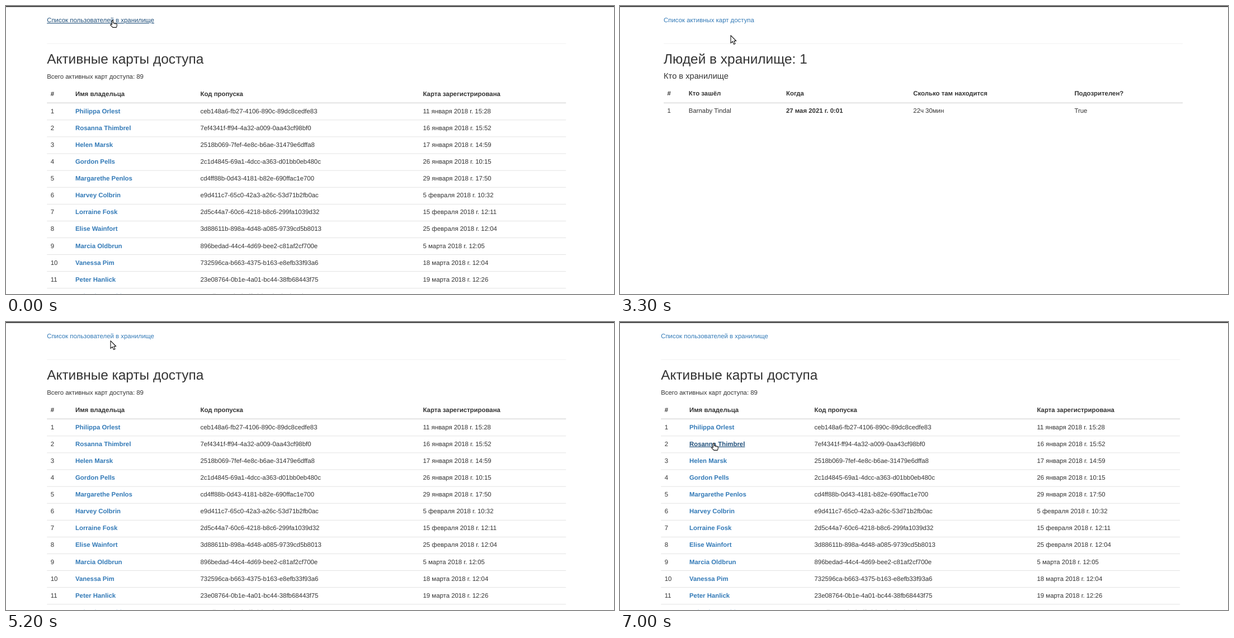
Animation of 1087 by 515 pixels, one loop 8000 ms. Source, as an HTML page:

```html
<!DOCTYPE html>
<html lang="ru">
<head>
<meta charset="utf-8">
<title>Карты доступа</title>
<style>
html, body { margin: 0; width: 100%; height: 100%; overflow: hidden; background: #fff; }
svg { display: block; }
text { font: 11.4px "Liberation Sans", Arial, Helvetica, sans-serif; fill: #333; text-rendering: geometricPrecision; white-space: pre; }
.bold { font-weight: 700; }
.h2 { font-size: 24.42px; }
.h4 { font-size: 14.65px; }
.link { fill: #337ab7; }
.link.hover { fill: #23527c; text-decoration: underline; }
.cursor { fill: #fff; stroke: #111; stroke-width: 1.1; stroke-linejoin: round; }
</style>
</head>
<body>
<svg id="stage" width="1087" height="515" viewBox="0 0 1087 515"></svg>
<script>
const LOOP = 8000;
const WIDTH = 928;
const ROW = 30.1;
const LINE = 0.814;
const stage = document.getElementById('stage');

function add(parent, tag, attrs = {}, content) {
  const node = document.createElementNS('http://www.w3.org/2000/svg', tag);
  for (const key in attrs) node.setAttribute(key, attrs[key]);
  if (content) node.textContent = content;
  parent.appendChild(node);
  return node;
}

const text = (parent, x, y, content, cls = '') => add(parent, 'text', { x, y, class: cls }, content);
const rule = (parent, x, y, height, fill) => add(parent, 'rect', { x, y, width: WIDTH, height, fill });

// Parts shared by both pages: link, divider, title, table head
function makePage(left, link, title, columns, headY) {
  const group = add(stage, 'g');
  const linkNode = text(group, left, 29.2, link, 'link');
  rule(group, left, 66.8, LINE, '#eee');
  text(group, left, 103.4, title, 'h2');
  columns.forEach(([x, label]) => text(group, x, headY, label, 'bold'));
  rule(group, left, 172.5, LINE * 2, '#ddd');
  return { group, link: linkNode };
}

const holders = [
  ['Philippa Orlest', 'ceb148a6-fb27-4106-890c-89dc8cedfe83', '11 января 2018 г. 15:28'],
  ['Rosanna Thimbrel', '7ef4341f-ff94-4a32-a009-0aa43cf98bf0', '16 января 2018 г. 15:52'],
  ['Helen Marsk', '2518b069-7fef-4e8c-b6ae-31479e6dffa8', '17 января 2018 г. 14:59'],
  ['Gordon Pells', '2c1d4845-69a1-4dcc-a363-d01bb0eb480c', '26 января 2018 г. 10:15'],
  ['Margarethe Penlos', 'cd4ff88b-0d43-4181-b82e-690ffac1e700', '29 января 2018 г. 17:50'],
  ['Harvey Colbrin', 'e9d411c7-65c0-42a3-a26c-53d71b2fb0ac', '5 февраля 2018 г. 10:32'],
  ['Lorraine Fosk', '2d5c44a7-60c6-4218-b8c6-299fa1039d32', '15 февраля 2018 г. 12:11'],
  ['Elise Wainfort', '3d88611b-898a-4d48-a085-9739cd5b8013', '25 февраля 2018 г. 12:04'],
  ['Marcia Oldbrun', '896bedad-44c4-4d69-bee2-c81af2cf700e', '5 марта 2018 г. 12:05'],
  ['Vanessa Pim', '732596ca-b663-4375-b163-e8efb33f93a6', '18 марта 2018 г. 12:04'],
  ['Peter Hanlick', '23e08764-0b1e-4a01-bc44-38fb68443f75', '19 марта 2018 г. 12:26'],
  ['Celestina Rudd', 'eacdbea1-cb1f-4ffb-bf2a-fa1fc4fce1f0', '']
];

const cards = makePage(73.2, 'Список пользователей в хранилище', 'Активные карты доступа', [
  [79.7, '#'], [124, 'Имя владельца'], [347.5, 'Код пропуска'], [745.5, 'Карта зарегистрирована']
], 160.8);
text(cards.group, 73.2, 129.9, 'Всего активных карт доступа: 89');
const names = holders.map(([name, code, date], i) => {
  const y = 191.7 + i * ROW;
  if (i) rule(cards.group, 73.2, y - 18.4, LINE, '#ddd');
  if (i < 11) text(cards.group, 79.7, y, String(i + 1));
  text(cards.group, 347.5, y, code);
  text(cards.group, 745.5, y, date);
  return text(cards.group, 124, y, name, 'link bold');
});

const vault = makePage(78.1, 'Список активных карт доступа', 'Людей в хранилище: 1', [
  [84.6, '#'], [122.8, 'Кто зашёл'], [297, 'Когда'], [524.3, 'Сколько там находится'], [812.4, 'Подозрителен?']
], 160.3);
text(vault.group, 78.1, 130.4, 'Кто в хранилище', 'h4');
[[84.6, '1'], [122.8, 'Barnaby Tindal'], [297, '27 мая 2021 г. 0:01', 'bold'], [524.3, '22ч 30мин'], [812.4, 'True']]
  .forEach(([x, label, cls]) => text(vault.group, x, 191.2, label, cls));

add(stage, 'rect', { width: 1087, height: 1.7, fill: '#333' });

const arrow = add(stage, 'g', { class: 'cursor' });
add(arrow, 'path', { d: 'M0 .6V14.3L3.3 11.4L5.5 16.4L7.9 15.4L5.8 10.5H9.7Z' });
const hand = add(stage, 'g', { class: 'cursor' });
add(hand, 'path', { d: 'M3.3 8.3V1.7a1.1 1.1 0 0 1 2.2 0V5.3L10.8 6.2q1.5.3 1.5 1.8V10.6L11.2 13.4H5L1 9.4q-.8-1.2.3-1.7 .9-.2 2 .6z' });
add(hand, 'path', { d: 'M7.6 5.9V7.4M9.8 6.3V7.8', 'stroke-width': 0.8 });

// time, page, cursor, x, y, hovered link
const steps = [
  [0, cards, hand, 186, 25, cards.link],
  [1000, vault, hand, 186, 25, vault.link],
  [1500, vault, arrow, 200, 66],
  [1600, vault, arrow, 234, 143],
  [1700, vault, arrow, 250, 184],
  [3300, vault, arrow, 198, 52],
  [3400, vault, arrow, 189, 41],
  [3500, vault, arrow, 187, 35, vault.link],
  [3600, vault, hand, 183, 29, vault.link],
  [3700, vault, hand, 183, 28, vault.link],
  [3800, vault, hand, 182, 29, vault.link],
  [3900, vault, hand, 182, 30, vault.link],
  [4600, vault, hand, 181, 31, vault.link],
  [4800, vault, arrow, 186, 32, vault.link],
  [5000, vault, arrow, 186, 33, vault.link],
  [5200, cards, arrow, 187, 33],
  [5500, cards, arrow, 193, 45],
  [5700, cards, arrow, 206, 92],
  [5800, cards, arrow, 223, 172],
  [5900, cards, arrow, 228, 240],
  [6000, cards, arrow, 203, 283],
  [6200, cards, arrow, 196, 299],
  [6300, cards, arrow, 185, 282],
  [6400, cards, arrow, 176, 262],
  [6600, cards, arrow, 172, 246],
  [6700, cards, arrow, 170, 228],
  [6800, cards, hand, 165, 218, names[1]],
  [7000, cards, hand, 163, 216, names[1]]
];
const links = [cards.link, vault.link, ...names];
const show = (node, on) => node.setAttribute('display', on ? 'inline' : 'none');
let current;

function draw() {
  const time = performance.now() % LOOP;
  const step = steps.findLast(s => s[0] <= time);
  if (step !== current) {
    current = step;
    const [, page, cursor, x, y, hovered] = step;
    [cards, vault].forEach(p => show(p.group, p === page));
    [arrow, hand].forEach(c => show(c, c === cursor));
    links.forEach(l => l.classList.toggle('hover', l === hovered));
    cursor.setAttribute('transform', `translate(${x} ${y})`);
  }
  requestAnimationFrame(draw);
}
draw();
</script>
</body>
</html>
```
